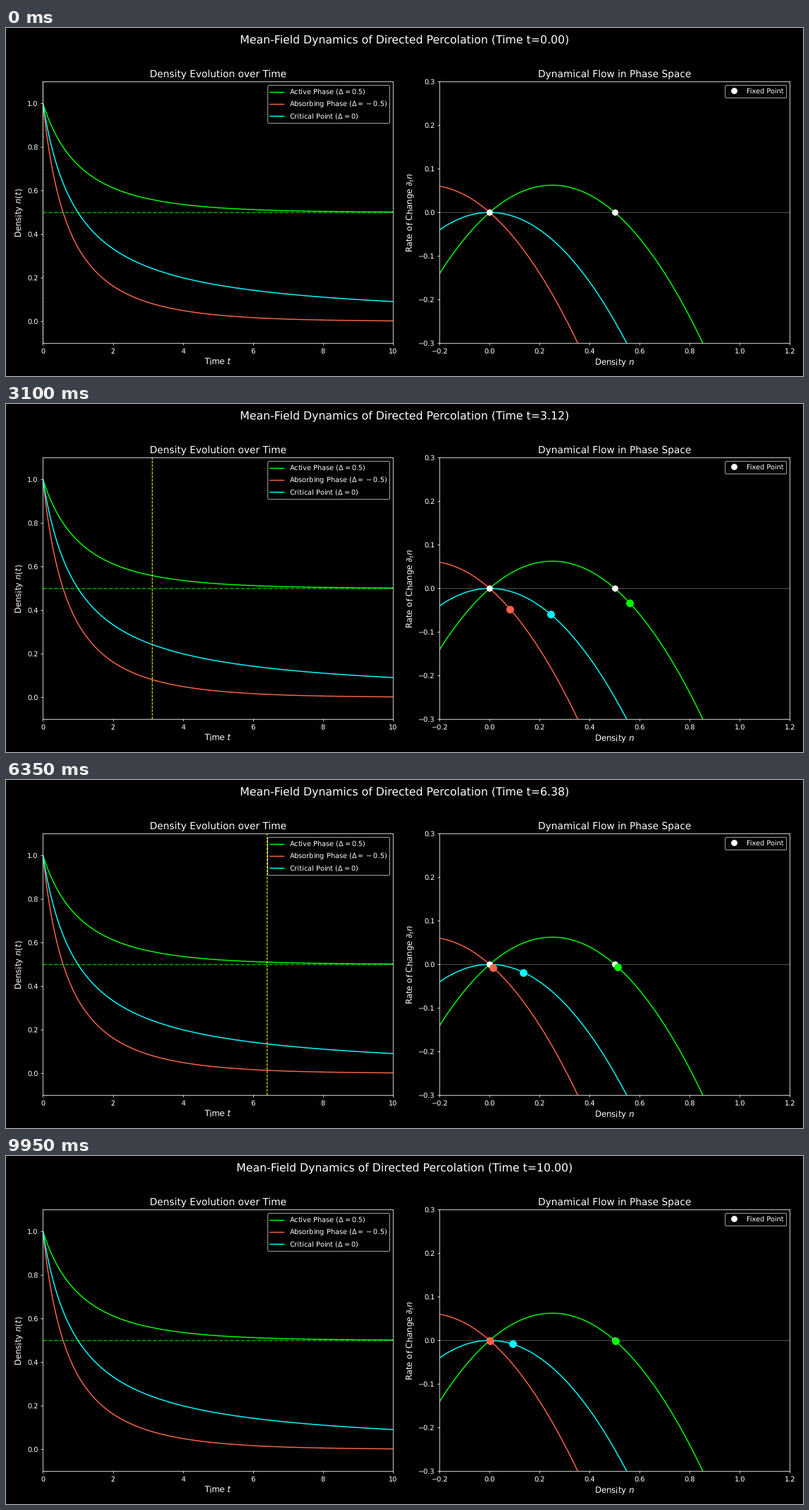
A matplotlib script for the animation above (10000 ms loop, 1131 by 495 pixels).

```python
import numpy as np
import matplotlib.pyplot as plt
from matplotlib.animation import FuncAnimation

W, H, DPI = 1131, 495, 70.7
FRAMES, INTERVAL = 200, 50
T_MAX = 10

plt.style.use("dark_background")
plt.rcParams["font.family"] = "DejaVu Sans"
plt.rcParams["text.hinting"] = "no_hinting"

PHASES = [
    ("Active Phase ($\\Delta=0.5$)", 0.5, "lime"),
    ("Absorbing Phase ($\\Delta=-0.5$)", -0.5, "tomato"),
    ("Critical Point ($\\Delta=0$)", 0.0, "cyan"),
]


def density(t, delta):
    """Solution of dn/dt = n (delta - n) with n(0) = 1."""
    if delta == 0:
        return 1 / (1 + t)
    return delta / (1 + (delta - 1) * np.exp(-delta * t))


def rate(n, delta):
    return n * (delta - n)


def add_panel(left, right, title, xlabel, ylabel, xlim, ylim):
    top, bottom = 76.3, 448.3
    ax = fig.add_axes([left / W, 1 - bottom / H, (right - left) / W, (bottom - top) / H])
    ax.set_title(title, fontsize=14)
    ax.set_xlabel(xlabel, fontsize=12, labelpad=3.4)
    ax.set_ylabel(ylabel, fontsize=12, labelpad=3.4)
    ax.set_xlim(*xlim)
    ax.set_ylim(*ylim)
    return ax


fig = plt.figure(figsize=(W / DPI, H / DPI), dpi=DPI)
heading = fig.suptitle("", fontsize=16, y=0.981)

ax_time = add_panel(52.4, 549.3, "Density Evolution over Time",
                    "Time $t$", "Density $n(t)$", (0, T_MAX), (-0.1, 1.1))
ax_flow = add_panel(615.4, 1112.4, "Dynamical Flow in Phase Space",
                    "Density $n$", "Rate of Change $\\partial_t n$", (-0.2, 1.2), (-0.3, 0.3))

times = np.linspace(0, T_MAX, FRAMES)
n = np.linspace(-0.2, 1.2, 400)
ax_flow.axhline(0, color="gray", lw=0.6)
for label, delta, color in PHASES:
    ax_time.plot(times, density(times, delta), color=color, lw=1.5, label=label)
    ax_flow.plot(n, rate(n, delta), color=color, lw=1.5)
ax_time.axhline(0.5, color="lime", ls="--", lw=1.5, alpha=0.7)
cursor = ax_time.axvline(0, color="yellow", ls="--", lw=1)

ax_flow.plot([0, 0.5], [0, 0], "o", color="white", ms=8, label="Fixed Point")
dots = [ax_flow.plot([], [], "o", color=color, ms=10)[0] for _, _, color in PHASES]

# math labels get pixel padding, so the rows are packed a little tighter
legend = ax_time.legend(loc="upper right", labelspacing=0.42, borderpad=0.33)
ax_flow.legend(loc="upper right")


def update(i):
    t = times[i]
    heading.set_text(f"Mean-Field Dynamics of Directed Percolation (Time t={t:.2f})")
    cursor.set_xdata([t, t])
    # the legend steps aside while the cursor would cross it
    legend.set_loc("upper center" if 6.4 < t < 9.92 else "upper right")
    for dot, (_, delta, _) in zip(dots, PHASES):
        x = density(t, delta)
        dot.set_data([x], [rate(x, delta)])
    return [heading, cursor, legend, *dots]


anim = FuncAnimation(fig, update, frames=FRAMES, interval=INTERVAL,
                     repeat=True, repeat_delay=0, blit=False)
plt.show()
```
